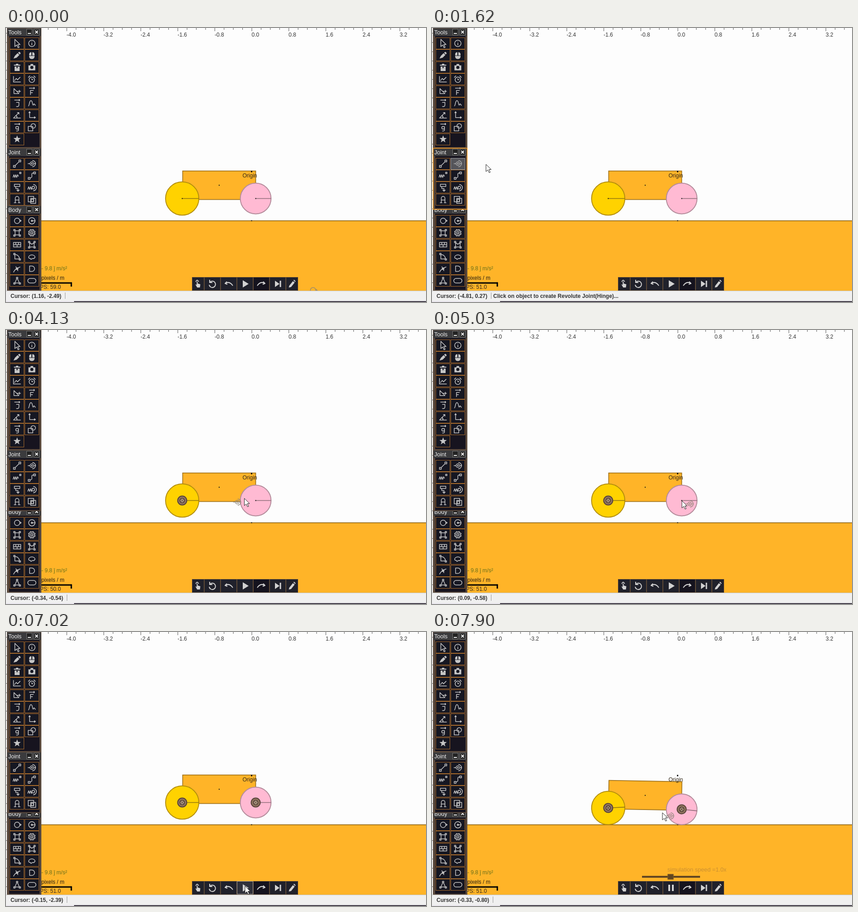
These frames come from a looping animation (926 by 605 pixels, 8000 ms). An HTML page with a canvas:

```html
<!DOCTYPE html>
<html>
<head>
<meta charset="utf-8">
<style>
html, body { margin: 0; width: 100%; height: 100%; overflow: hidden; background: #fdfdfd; }
canvas { display: block; }
</style>
</head>
<body>
<canvas id="stage" width="926" height="605"></canvas>
<script>
const g = document.getElementById('stage').getContext('2d');
const LOOP = 8000, STEP = 110, SCALE = 102, OX = 542, OY = 317.6;
const PICK = 1290, JOIN_REAR = 3700, JOIN_FRONT = 5460, RUN = 7250;
const SANS = '"Liberation Sans", Arial, sans-serif';

// Path pieces, each centred on its button.
const ring = (r, x = 0, y = 0) => `M${x - r} ${y}a${r} ${r} 0 1 0 ${2 * r} 0a${r} ${r} 0 1 0 ${-2 * r} 0Z`;
const box = (w, x = 0, y = 0, h = w) => `M${x - w / 2} ${y - h / 2}h${w}v${h}h${-w}Z`;
const spokes = (n, f) => 'M' + Array.from({ length: n }, (_, i) => {
  const a = i * 2 * Math.PI / n - Math.PI / 2, r = f(i);
  return `${(r * Math.cos(a)).toFixed(2)} ${(r * Math.sin(a)).toFixed(2)}`;
}).join('L') + 'Z';
const corners = [-6, 6].map(x => box(3, x, -6) + box(3, x, 6)).join('');
const rod = box(4, -6, 6) + box(4, 6, -6);
const spring = 'M-9 4l2-6' + 'l2 6l2-6'.repeat(2);
const hinge = ring(4) + ring(1) + 'M-9 0h5M1-7a7 7 0 0 1 0 14M5 0h4';
const roller = ring(6) + 'M6-2l3 2-3 2';
const vector = 'M-6-7H6m-2-2l2 2-2 2';
const tip = 'v16l4-3.5 3 6 2.5-1-3-6h5Z';
const bend = 'M-4-5l-4 4 5 2m-5-2q10-6 17 5';
const play = '*M-5-8L8 0-5 8Z', pause = '*' + box(4, -4, 0, 14) + box(4, 4, 0, 14);

// A leading * marks a filled icon.
const toolIcons = [
  'M-5-9' + tip, ring(7) + 'M0-1v5M0-4v1',
  '*M-8 7l3-6 6-6 4 4-6 6ZM2-6l3-2 3 3-2 3Z', '*M-6 0v-2q0-5 5-5V0ZM6 0v-2q0-5-5-5V0ZM-6 1H6v2q-1 5-6 5t-6-5Z',
  '*' + box(11, 0, 3, 10) + box(14, 0, -5, 2) + box(5, 0, -7, 2) + spokes(8, i => i % 2 ? 3.5 : 1),
  '*' + box(15, 0, 1, 11) + box(6, 0, -6, 3) + ring(3.5),
  'M-8-7V6H8M-6 3l4-5 3 3 6-6', ring(6, 0, 1) + 'M0-2v3h3M-8-4l4-4M8-4l-4-4',
  'M-7-6L4 5H-7ZM0 0h8M5-3v6', vector + 'M-3 8V-2h7M-3 3h5',
  vector + 'M-2-2h6v6q0 4-6 3', 'M-8 6c3 0 2-12 6-12s3 10 5 10 0-7 5 1',
  'M8 6H-8L4-6M0-6h4v4M0 6q0-4-3-6', 'M-5-8V5H8M-7-5l2-3 2 3M5 3l3 2-3 2',
  vector + ring(3, 0, 1) + 'M3-2v8q0 3-5 2', box(10, -3, 3) + ring(5, 3, -3),
  '*' + spokes(10, i => i % 2 ? 3.5 : 8.5)
];
const jointIcons = [
  rod + 'M-4 4l8-8', hinge, spring + 'l2 4' + box(3, 7, -6), rod + 'M-4 5c9 0-1-11 8-11',
  box(12, 0, -5, 5) + 'M-3-2v4h5v6m-3-3l3 3 3-3', spring + ring(3, 3) + 'M3-7a7 7 0 0 1 0 14',
  'M-4 7V-3a4 4 0 0 1 8 0v10M-7 7h5M2 7h5M-4 1h8', box(12, -2, -1) + box(11, 3, 3) + box(5, 1, 2)
];
const bodyIcons = [
  roller, ring(7) + '*'.slice(1) + ring(1.5) + 'M0 0h8', corners + box(9), spokes(24, i => i % 3 ? 7.5 : 5) + ring(2.5),
  box(16, 0, 0, 10) + 'M-8 0H8M-3-5v5M3-5v5M0 0v5', corners + 'M-5-5l5 4 5-4V5H-5Z',
  box(3, -6, -6) + box(3, 6, 6) + 'M-5-5V5H5q0-9-10-10Z', 'M-7 1a7 5 0 1 1 14 0q-2 4-6 3l-3 2-1-2q-4 0-4-3Z',
  ring(2) + 'M-8 8Q-5 0 7-4M-3-5l5 10', 'M-5-6h5a6 6 0 0 1 0 12h-5Z',
  box(3, 0, -6) + box(3, -6, 6) + box(3, 6, 6) + 'M-1-4L-5 5H5L1-4', 'M-4-5h8a5 5 0 0 1 0 10h-8a5 5 0 0 1 0-10Z'
];
const barIcons = [
  '*M-3-5h2v4l6 2-1 7h-6l-4-7 3 1ZM-6-5q4-8 8 0l-1 1q-3-6-6 0Z', 'M-5-4a7 7 0 1 1-2 6M-6-9v6h6',
  bend, play, bend, '*M-6-7L4 0-6 7Z' + box(3, 6, 0, 14), '*M-6 4l8-10 4 3-8 10-5 1ZM3-8l2-1 3 3-1 2Z'
];

// Pointer moves: start, steps, x, y.
const moves = [[180, 7, 100, 314], [1070, 4, 58, 300], [1510, 2, 119, 301], [1730, 2, 205, 366], [1940, 7, 383, 378],
  [3050, 3, 389, 377], [4130, 2, 545, 371], [4470, 6, 551, 377], [6020, 1, 558, 481], [6130, 7, 527, 561],
  [7140, 6, 508, 399]];

const mix = (a, b, k) => a.map((v, i) => v + (b[i] - v) * k);
function pointer(t) {
  let p = [660, 572];
  for (const [start, n, ...to] of moves) {
    if (t < start) break;
    const k = Math.min(1, (Math.floor((t - start) / STEP) + 1) / n);
    p = mix(p, to, 1 - (1 - k) ** 3);
  }
  return p;
}
function rect(x, y, w, h, fill, edge, lw = 1) {
  if (fill) { g.fillStyle = fill; g.fillRect(x, y, w, h); }
  if (edge) { g.strokeStyle = edge; g.lineWidth = lw; g.strokeRect(x + .5, y + .5, w - 1, h - 1); }
}
function line(x1, y1, x2, y2, color, w = 1) {
  g.strokeStyle = color; g.lineWidth = w;
  g.beginPath(); g.moveTo(x1, y1); g.lineTo(x2, y2); g.stroke();
}
function disc(x, y, r, fill, edge, w) {
  g.beginPath(); g.arc(x, y, r, 0, 7);
  g.fillStyle = fill; g.fill();
  g.strokeStyle = edge; g.lineWidth = w; g.stroke();
}
function text(s, x, y, color, size = 12, weight = '') {
  g.font = `${weight} ${size}px ${SANS}`; g.fillStyle = color;
  g.fillText(s, x, y);
}
function icon(d, x, y, color = '#c6c6c6', w = 1.5, flip = 1) {
  const p = new Path2D(d.replace('*', ''));
  g.save(); g.translate(x, y); g.scale(flip, 1);
  g.fillStyle = g.strokeStyle = color; g.lineWidth = w; g.lineJoin = 'round';
  d[0] === '*' ? g.fill(p, 'evenodd') : g.stroke(p);
  g.restore();
}
function dotted(x, y, w, h) {
  g.setLineDash([1, 1]); rect(x, y, w, h, null, '#e8e8e8'); g.setLineDash([]);
}

function ruler() {
  const gap = SCALE / 5;
  for (let i = -22; i <= 18; i++) {
    const x = OX + i * gap;
    line(x, 0, x, i % 4 ? 4 : 7, '#555');
    if (i % 4 === 0 && i > -24) text((i / 5).toFixed(1), x - .5, 18.5, '#333');
  }
  for (let i = -15; i <= 12; i++) line(0, OY + i * gap, 3, OY + i * gap, '#555');
}
function wheel(x, y, r, fill, edge, mark, angle, joint) {
  g.save(); g.translate(x, y); g.rotate(angle);
  disc(0, 0, r, fill, edge, 2);
  line(0, 0, r, 0, mark, 1.6);
  if (joint) {
    disc(0, 0, 10, '#91745f', '#57443a', 2);
    disc(0, 0, 5, '#b29b85', '#45362e', 1.5);
    icon('M-3-3l6 6m0-6l-6 6', 0, 0, '#45362e', 1);
  } else rect(-1, -1, 2, 2, '#111');
  g.restore();
}
function scene(t) {
  const s = t < RUN ? 0 : Math.floor((t - RUN) / STEP) * STEP / 1000;
  const fall = 9.8 * SCALE / 2 * s * s;
  const rear = Math.min(12, fall), front = Math.min(15, fall), turn = front / 15;
  rect(78, 426, 848, 154, '#ffb428');
  line(78, 425.6, 926, 425.6, '#916a18', 1.7);
  rect(540.5, 424.5, 2, 2, '#111');
  g.save();
  g.translate(470, 347.2 + (rear + front) / 2); g.rotate(Math.atan((front - rear) / 162));
  rect(-80.5, -31.5, 161, 63, '#ffb428');
  g.strokeStyle = '#a1731a'; g.lineWidth = 1.7; g.strokeRect(-80.5, -31.5, 161, 63);
  rect(-1, -1, 2, 2, '#111');
  g.restore();
  rect(540, 315.5, 3, 3, '#111');
  text('Origin', 521.5, 329.5, '#33291a');
  wheel(388.5, 376.5 + rear, 36.7, '#ffd200', '#b5900c', '#8f7410', -.05 * turn, t >= JOIN_REAR);
  wheel(550.5, 376.5 + front, 33.9, '#ffbad3', '#b48c9b', '#8d6c79', .1 * turn, t >= JOIN_FRONT);
}
function readouts(t) {
  const fps = t < 180 ? 59 : t >= 3600 && t < 4470 ? 50 : 51;
  text('- 9.8 ĵ m/s²', 78, 534.5, '#67701a');
  text('pixels / m', 78, 555.5, '#221d12');
  text(`FPS: ${fps.toFixed(1)}`, 67.5, 576, '#33291a');
  rect(78, 561.5, 67, 3, '#000'); rect(142.5, 561.5, 3, 9.5, '#000');
}
function titleBar(name, y) {
  rect(3, y, 74, 17, '#3b3b3d');
  text(name, 5, y + 12.5, '#eee', 12.5);
  for (const x of [45, 61]) rect(x, y + 1, 13, 14, '#222', '#777');
  icon('M-3 3h7', 51, y + 8, '#eee', 2);
  icon('M-3-3l6 6m0-6l-6 6', 67.5, y + 8, '#eee', 2);
}
function panel(name, y, bottom, first, icons) {
  rect(2, y, 76, bottom - y, '#5b4a3d');
  rect(7, y + 18, 67, bottom - y - 20, '#17141f');
  titleBar(name, y + 1);
  icons.forEach((d, i) => {
    const col = i % 2, cy = first + (i >> 1) * 26.45;
    rect(8 + col * 33, Math.round(cy - 13), 32, 26, '#161722', '#a96c2c');
    icon(d, 24.5 + col * 32.5, cy);
  });
}
function panels(t) {
  const picked = t >= PICK;
  panel('Tools', 0, 265, 34, toolIcons);
  panel('Body', 392, 580, 425.7, bodyIcons);
  panel('Joint', 265, picked ? 400 : 392, 299.5, jointIcons);
  if (t >= 1180 && t < 1840) {
    rect(41, 287, 32, 26, '#55555a'); icon(hinge, 57, 299.5, '#aaa');
  }
  if (picked && t < JOIN_REAR) {
    dotted(41, 287, 32, 26);
    rect(2, 265, 76, 136, null, '#f39a22', 1.6);
  }
}
function toolbar(t) {
  const running = t >= RUN, hover = t >= 6700 && t < RUN + STEP;
  const edge = i => Math.min(644, Math.max(410, 401 + 36 * i));
  barIcons.forEach((d, i) => {
    const x = edge(i), w = edge(i + 1) - x, on = i === 3 && hover;
    rect(x, 550, w, 30, on ? '#30313b' : i === 4 ? '#15131e' : '#20212b', '#5d4936');
    icon(i === 3 && running ? pause : d, x + w / 2, 565, '#d2d2d2', 2, i === 4 ? -1 : 1);
    if (on) dotted(x, 550, w, 29);
  });
  if (running) {
    text('simulation speed =1.0x', 519, 528.5, '#cb9030', 12.7);
    rect(463, 538.5, 128, 4, '#5a4120');
    rect(519.5, 534.5, 13, 12, '#614620', '#866022');
  }
}
function statusBar(t, at) {
  rect(0, 580, 926, 23, '#f0f0f0');
  line(0, 580.5, 926, 580.5, '#c4c4c4');
  rect(0, 603, 926, 2, '#e9e6ee');
  rect(150, 603, 776, 2, '#3b3542');
  const x = (at[0] - OX) / SCALE, y = (OY - at[1]) / SCALE;
  const s = `Cursor: (${x.toFixed(2)}, ${y.toFixed(2)})`;
  text(s, 10, 595.5, '#333', 12, 'bold');
  const end = 10 + g.measureText(s).width, bar = Math.round(end + 8) + .5;
  line(bar, 584, bar, 598, '#999');
  if (t >= PICK && t < JOIN_REAR)
    text('Click on object to create Revolute Joint(Hinge)...', end + 13, 595.5, '#333', 12, 'bold');
}
function arrow(p) {
  icon('*M0 0' + tip, ...p, '#fff');
  icon('M0 0' + tip, ...p, '#222', 1);
}

function draw(t) {
  const now = pointer(t), before = pointer(t - STEP);
  // Readout and badge trail the pointer; both wait while it is over the panels.
  const waiting = t >= 1070 && t < 1730;
  const read = waiting ? [51.4, 290.1] : mix(before, now, .87);
  const badge = waiting ? read : mix(before, now, .76);

  rect(0, 0, 926, 605, '#fdfdfd');
  ruler();
  scene(t);
  readouts(t);
  g.globalAlpha = .8;
  icon(t < PICK ? roller : hinge, badge[0] + 17, badge[1] + 7, '#8c8377', 1.7);
  g.globalAlpha = 1;
  toolbar(t);
  panels(t);
  statusBar(t, read);
  if (t >= 180) arrow(now);
}
const start = performance.now();
function tick() {
  draw((performance.now() - start) % LOOP);
  requestAnimationFrame(tick);
}
tick();
</script>
</body>
</html>
```
